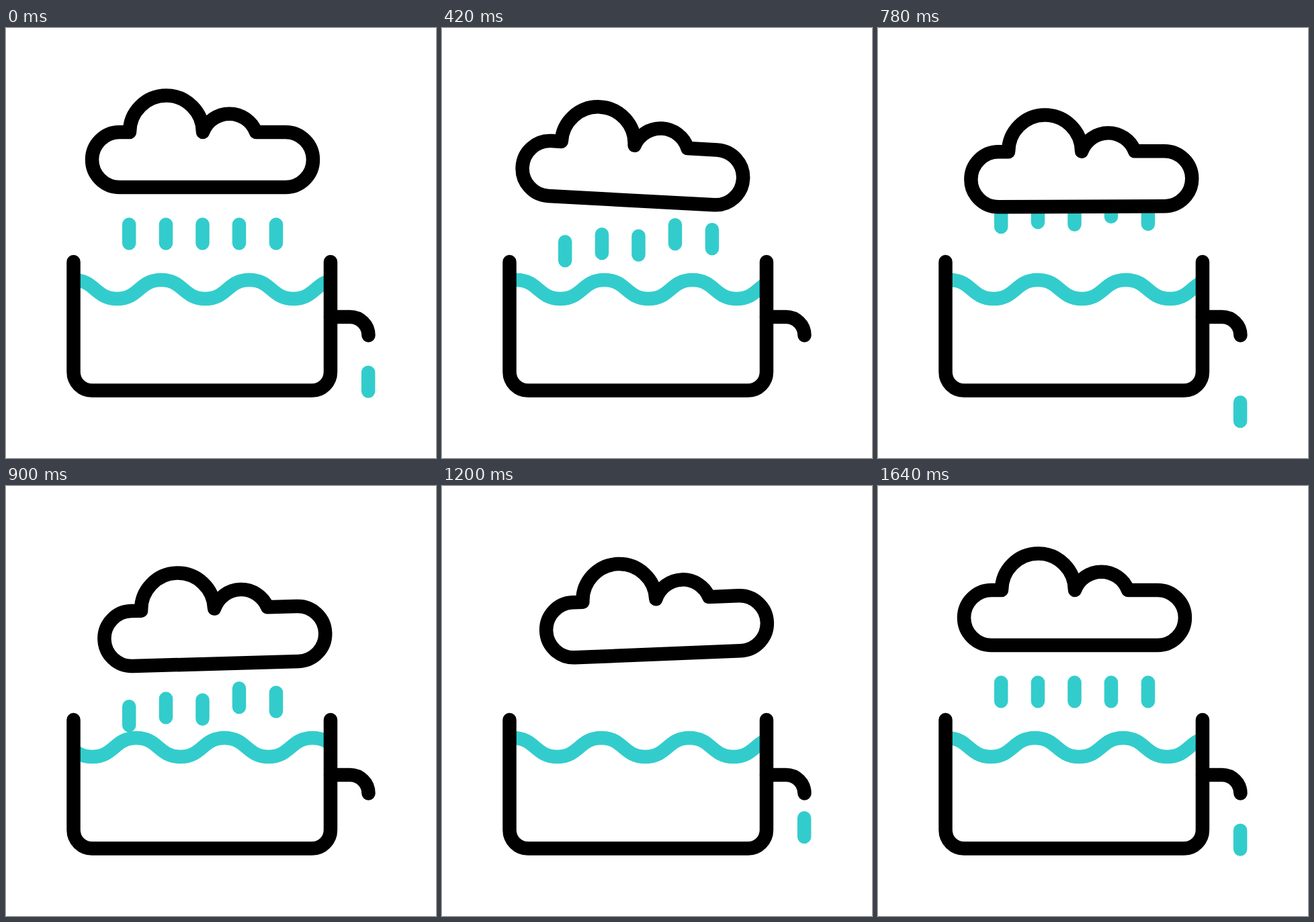
An HTML page for the animation above (2400 ms loop, 640 by 640 pixels).

```html
<!DOCTYPE html>
<html lang="en">
<head>
<meta charset="utf-8">
<title>Rainwater tank</title>
<style>
  html, body { margin: 0; height: 100%; overflow: hidden; background: #fff; }
  svg { display: block; width: 100vw; height: 100vh; }
  path { fill: none; stroke: #000; stroke-width: 20.5; stroke-linecap: round; stroke-linejoin: round; }
  .water path { stroke: #3cc; }
  #cloud { fill: #fff; }
</style>
</head>
<body>
<svg viewBox="0 0 640 640">
  <clipPath id="inside"><rect x="100" y="300" width="383" height="240"/></clipPath>
  <g class="water">
    <g clip-path="url(#inside)"><path id="wave"/></g>
    <path id="rain"/>
    <path id="drip"/>
  </g>
  <path d="M100.5 348V512a27.5 27.5 0 0 0 27.5 27.5H455.5a27.5 27.5 0 0 0 27.5-27.5V348"/>
  <path d="M483 430H512a27.5 27.5 0 0 1 27.5 27.5"/>
  <path id="cloud" d="M169 155H184A54.5 54.5 0 0 1 293 155A42.2 42.2 0 0 1 372 155H416a41 41 0 0 1 0 82H169a41 41 0 0 1 0-82Z"/>
</svg>
<script>
const LOOP = 2400, STEP = 20, MOTION_END = 1640;
const WAVELENGTH = 131.2;
const DROP_LENGTH = 27.75, REST = 292.5, CLOUD_Y = 226;
const TAP_Y = 457.5, DRIP_REST = 540.5, DRIP_END = 604;

// x, lowest point, fall speed (px/ms), bottom at 420 ms, time the first drop is gone
const DROPS = [
  [183.2, 390, 0.5, 346, 250],
  [238, 400, 0.46, 335, 240],
  [292.5, 385, 0.45, 337.5, 290],
  [347, 382, 0.402, 321, 295],
  [402, 372.5, 0.362, 328, 295]
];

// time, x, y
const DRIFT = [
  [0, 0, 0], [120, -5.3, 4.4], [260, -8.6, 11], [420, -8.6, 19.7], [640, 1, 27.7],
  [900, 18.3, 27.5], [1080, 26.3, 19.5], [1200, 27, 13.3], [1420, 17, 1.8],
  [1540, 8, -0.8], [1640, 0, 0]
];

// time, degrees
const TILT = [[0, 0], [400, 3.1], [1080, -2.6], [1640, 0]];

const el = id => document.getElementById(id);
const clamp = (v, lo = 0, hi = 1) => Math.min(hi, Math.max(lo, v));
const mix = (a, b, p) => a + (b - a) * p;
const progress = (t, from, to) => clamp((t - from) / (to - from));

// cubic-bezier(1/6, 0, 5/6, 1)
function softEase(x) {
  let lo = 0, hi = 1;
  for (let i = 0; i < 24; i++) {
    const u = (lo + hi) / 2;
    const bx = u * (1 - u) ** 2 / 2 + 2.5 * u * u * (1 - u) + u ** 3;
    if (bx < x) lo = u; else hi = u;
  }
  return lo * lo * (3 - 2 * lo);
}

function segment(keys, t) {
  let i = 0;
  while (i < keys.length - 2 && t >= keys[i + 1][0]) i++;
  return i;
}

function spline(keys, t, axis) {
  const i = segment(keys, t), last = keys.length - 1;
  const slope = k => {
    const a = keys[Math.max(0, k - 1)], b = keys[Math.min(last, k + 1)];
    return (b[axis] - a[axis]) / (b[0] - a[0]);
  };
  const a = keys[i], b = keys[i + 1], span = b[0] - a[0], u = (t - a[0]) / span;
  return mix(a[axis], b[axis], u * u * (3 - 2 * u))
    + span * u * (1 - u) * (slope(i) * (1 - u) - slope(i + 1) * u);
}

function tilt(t) {
  const i = segment(TILT, t), a = TILT[i], b = TILT[i + 1];
  return mix(a[1], b[1], (1 - Math.cos(Math.PI * progress(t, a[0], b[0]))) / 2);
}

// A streak of water, cut off at both ends of its track
function streak(x, top, bottom, from, to) {
  if (bottom <= from || top >= to) return "";
  return `M${x} ${Math.max(top, from)}V${Math.min(bottom, to) + 0.01}`;
}

function rainPath(t) {
  return DROPS.map(([x, end, speed, bottomAt420, gone]) => {
    let d = "";
    if (t < gone) {
      const p = t / gone;
      d += streak(x, mix(REST, end, p), mix(REST + DROP_LENGTH, end, p), CLOUD_Y, end);
    }
    for (const start of [0, 460]) {
      const bottom = bottomAt420 + speed * (t - start - 420);
      d += streak(x, bottom - DROP_LENGTH, bottom, CLOUD_Y, end);
    }
    const p = softEase(progress(t, 1160, 1610));
    return d + streak(x, mix(CLOUD_Y, REST, p), mix(CLOUD_Y, REST + DROP_LENGTH, p), CLOUD_Y, end);
  }).join("");
}

function dripPath(t) {
  const drop = (bottom, end) => streak(539.2, bottom - DROP_LENGTH, bottom, TAP_Y, end);
  const settle = 1 - (1 - progress(t, 1000, 1380)) ** 2;
  return drop(DRIP_REST + 0.4 * t, 593)
    + drop(522 + 0.45 * (t - 640), DRIP_END)
    + drop(mix(TAP_Y, DRIP_REST, settle), DRIP_END);
}

function wavePath(t) {
  const shift = 391 * softEase(progress(t, 0, 1240)) % WAVELENGTH;
  const half = WAVELENGTH / 2, q = half / 2;
  const cycle = `c${q} 0 ${q} 28 ${half} 28s${q}-28 ${half}-28`;
  return `M${231 - 2 * WAVELENGTH - shift} 375` + cycle.repeat(6);
}

function draw(now) {
  const t = Math.min(Math.floor(now % LOOP / STEP) * STEP, MOTION_END);
  el("wave").setAttribute("d", wavePath(t));
  el("rain").setAttribute("d", rainPath(t));
  el("drip").setAttribute("d", dripPath(t));
  el("cloud").setAttribute("transform",
    `translate(${spline(DRIFT, t, 1)} ${spline(DRIFT, t, 2)}) rotate(${tilt(t)} 292.5 196)`);
}

let began;
function frame(now) {
  began ??= now;
  draw(now - began);
  requestAnimationFrame(frame);
}
draw(0);
requestAnimationFrame(frame);
</script>
</body>
</html>
```
